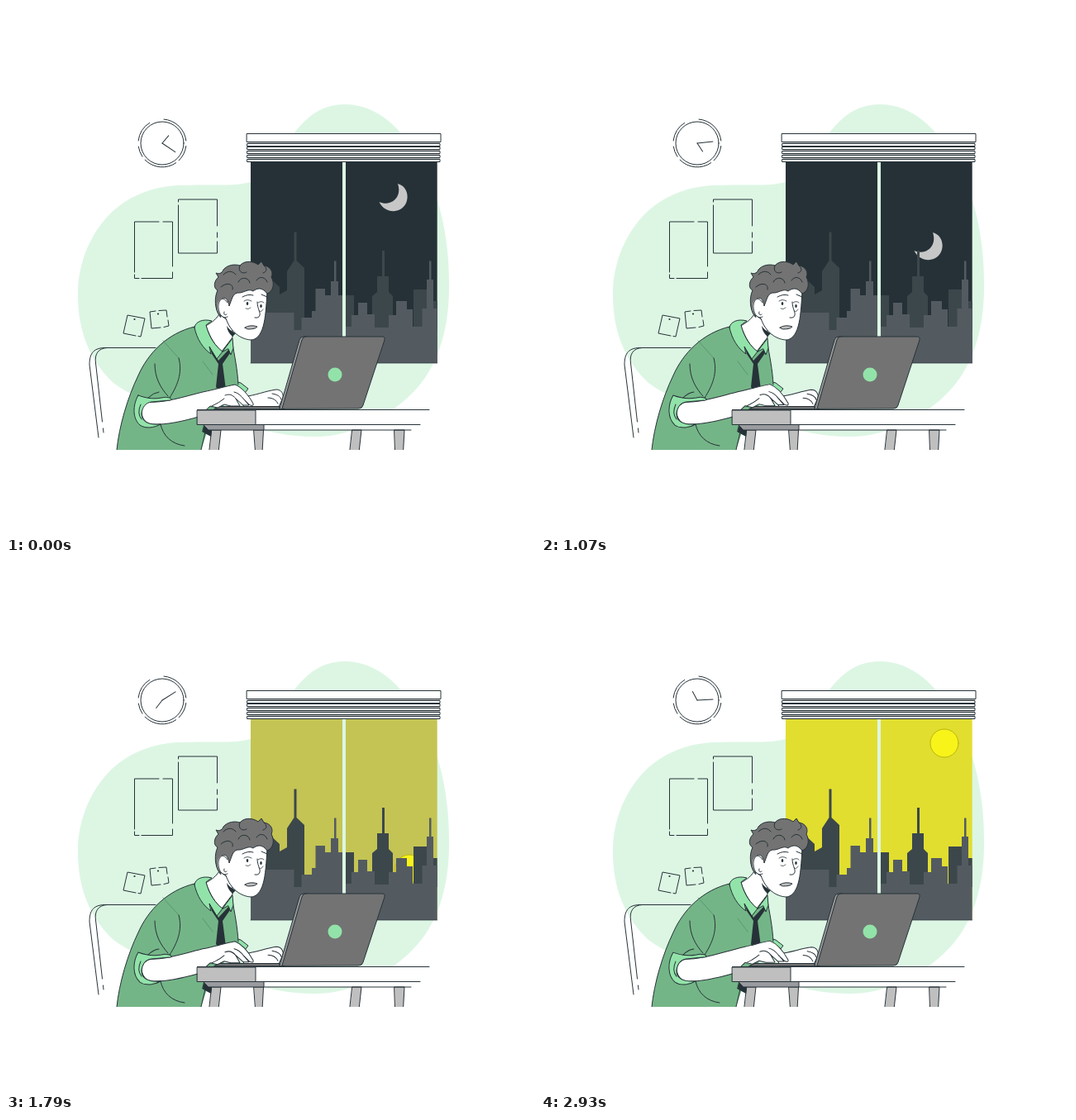
Write an HTML page that moves like this. It is 640 by 640 pixels and loops after 3 s.

```html
<!DOCTYPE html>
<html lang="en">
<head>
<meta charset="utf-8">
<title>Late night at work</title>
<style>
html, body { margin: 0; width: 100%; height: 100%; overflow: hidden; background: #fff; }
svg { display: block; width: 100%; height: 100%; }
.line { fill: none; }
.ink { fill: #263238; }
.white { fill: #fff; }
.pale { fill: #ddf6e4; }
.mint { fill: #92e3a9; }
.shirt { fill: #74b587; }
.grey { fill: #737373; }
.silver { fill: #bfbfbf; }
.far { fill: #3c474b; }
.near { fill: #535b61; }
.flat { stroke: none; }
</style>
</head>
<body>
<svg viewBox="0 0 640 640" stroke="#263238" stroke-linecap="round" stroke-linejoin="round">
  <defs>
    <clipPath id="pane"><path d="M296 166H521.700V432H296Z"/></clipPath>
  </defs>

  <path class="pale flat" d="M87 345C88 295 120 222 208 217C250 215 272 219 296 213C335 200 345 119 410 119C450 119 480 150 497 182C520 215 536 270 536 335C537 400 518 455 468 488C435 510 405 521 375 521C320 521 290 505 250 497C215 487 165 483 130 456C100 428 86 390 87 345Z"/>

  <!-- clock -->
  <circle class="white" cx="189" cy="166" r="26"/>
  <g id="rim" class="line"></g>
  <path id="hour" class="line" d="M189 166V154"/>
  <path id="minute" class="line" d="M189 166V147"/>

  <!-- wall -->
  <g class="line">
    <path d="M185 261H155.500V322M155.500 325V329.500H161M164 329.500H201.500V322M201.500 315V261H190"/>
    <path d="M208.500 237V234H255.500V266M255.500 274V280M255.500 285V299H208.500V241"/>
    <path d="M157 399L142 396L147 374L168 378L163 400L160 399.500M187 389L176 390L174 370L181 369M185 368.500L194 368L195 376M196 380L197 387L191 388.500"/>
  </g>
  <circle class="ink flat" cx="155.500" cy="379" r="1.100"/>
  <circle class="ink flat" cx="184" cy="372.500" r="1.100"/>

  <!-- window -->
  <g clip-path="url(#pane)">
    <path id="sky" class="flat" d="M296 166H522V432H296Z"/>
    <path id="moon" class="flat" fill="#c7c7c7" d="M474 215C489 219 489 240 477 246C468 251 456 247 451.500 237C464 243 480 233 474 215Z"/>
    <circle id="sun" cx="488" r="17" fill="#f8f41a" stroke="#b9b50c"/>
    <g class="flat">
      <path class="far" d="M296 328H318L331 340V349L340 344V321L348.500 308V273.500H351.500V308L361 317V400H296ZM406 350H421V392H406ZM443 392V351L449 346V327H455V296H458V327H463V346L468 351V392ZM493 343H511V357H522V392H493Z"/>
      <path class="near" d="M296 371H348.500V392H357.500V377H370V369H374.500V342H386V350H393V333H397V308.500H399.500V333H402V350H407V369H410V388H418V374H426V359H437V373H446V389H463V374H472V357H485V367H492V388H503.500V366H509V331H512V308.500H514.500V331H517V366H522V432H296Z"/>
    </g>
  </g>
  <path class="pale flat" d="M407 168H411V432H407Z"/>
  <path class="line" stroke-width=".7" d="M296 432H521.500"/>
  <path class="silver flat" d="M293 165H525V189H293Z"/>
  <g id="slats" class="white"></g>
  <path class="white" d="M291.500 154.500H526V164.500H291.500Z"/>

  <!-- chair -->
  <path class="line" d="M112 522L101 434C101 420 106 413 122 413.500H181M122 413.500C111 414 107 422 108.500 432L116.500 503M117.500 511L118 516"/>

  <!-- far arm -->
  <path class="mint" d="M259 465C264 455 276 453 284 456L293 463L286 472Z"/>
  <path id="farHand" class="white" d="M286 473C303 471 313 466 327 464C333 464 336 469 335 474L329 487H288ZM322 469C328 470 332 472 333 476M317 474C323 474 327 477 329 481"/>

  <!-- shirt -->
  <path class="shirt" stroke="none" d="M134 537C137 508 147 474 160 447C172 420 195 396 228 388L247 405L273 404C277 425 280 440 281 458L262 466L264 488L246 507L236 537Z"/>
  <path class="line" d="M134 537C137 508 147 474 160 447C172 420 195 396 228 388M273 404C277 425 280 440 281 458M236 537L243 507"/>
  <path class="line" stroke="#4f8a63" stroke-width=".7" d="M190 405L209 426M238 430L250 446"/>
  <path class="line" d="M209 426C214 444 207 460 198 474M180 433C180 450 187 462 196 472M187 506C190 520 200 530 216 532"/>

  <!-- neck and tie -->
  <path class="white" d="M258 373C252 382 246 384 242 387C247 402 254 412 261 418L274 401V385Z"/>
  <path class="ink flat" d="M267 387Q271 393 278 396L274 400Q268 395 267 387Z"/>
  <path class="ink flat" d="M247 413L257 429L270 415L271 420L262 433L266 464L259 468L254 461L257 433L249 421Z"/>
  <path class="mint" d="M228 389C229 382 238 378 249 381L242 386C246 402 254 412 262 418L255 427L246 412L248 421C238 414 231 403 228 389Z"/>
  <path class="mint" d="M262 418L274 402L275 414L272 422L269 415Z"/>
  <path class="ink" d="M240 507H249V521L238 515Z"/>

  <!-- head -->
  <path class="white" d="M262 352C273 340 300 333 316 345C315 362 314 378 311 388C308 398 303 404 296 404C284 403 272 395 266 378C255 374 254 356 262 352Z"/>
  <path class="grey" d="M259 376C252 367 252 352 256 344C250 341 252 332 257 328L254 323C259 325 262 322 263 319C268 313 277 312 283 314C289 307 300 309 305 313L309 309L312 314C320 315 324 322 321 328C325 335 324 345 316 348C310 340 304 341 299 345C293 341 287 348 280 347C274 348 273 356 270 363C269 353 262 350 259 357C257 363 257 369 260 376Z"/>
  <path class="line" d="M263 325C269 319 275 321 278 325M283 314C280 321 286 325 291 322M260 340C268 333 276 337 274 343M281 334C284 327 294 328 295 335M303 332C307 326 314 328 316 334M312 314C317 318 315 322 311 323"/>
  <path class="white flat" d="M257 358C262 350 268 354 269 362L269 377C258 378 254 367 257 358Z"/>
  <path class="line" d="M268 359C263 350 256 355 257 366C258 374 263 379 268 376M264 370C263 373 265 375 267 373"/>
  <path class="line" d="M286 352Q293 348 299 350M309 349L316 352"/>
  <path class="line" d="M304 358C304 366 308 370 307 374Q306 378 301 377"/>
  <path class="line" stroke-width=".7" d="M290 366Q293 368 296 365M306 369Q309 371 311 367"/>
  <path id="lids" class="line" stroke-width=".8"/>
  <g id="pupils" class="ink flat">
    <ellipse cx="292" cy="360" rx="1.300" ry="2"/>
    <ellipse cx="308.500" cy="363" rx="1.300" ry="2"/>
  </g>
  <path class="silver" d="M289 389Q296 385 304 388Q302 391 293 391Z"/>

  <path class="grey" d="M252 487.500L258 484.500H331V487.500Z"/>

  <!-- near arm -->
  <g id="arm">
    <path class="white" d="M170 479C190 481 214 473 238 467C253 464 266 460 277 458C285 461 293 470 299 481C300 484 297 484 294 482L288 476L294 483H287L278 475L283 484H272L264 482L256 486L247 484L233 497C215 502 195 507 176 506C162 503 161 486 170 479Z"/>
    <path class="line" d="M278 475C274 470 270 469 265 471M288 476Q282 468 276 467M249 484Q258 480 264 475"/>
    <path class="mint" d="M160 471C153 483 153 499 162 507C169 512 180 510 187 506C172 507 164 503 164 493C165 485 169 480 176 479L199 477C203 475 195 472 188 474C177 476 168 474 160 471Z"/>
    <path class="line" d="M163 482Q158 493 164 500M172 474Q178 468 185 467"/>
  </g>

  <!-- table -->
  <path class="white flat" d="M302 489H512L500 506L490 513H302Z"/>
  <path class="silver" d="M249 513H260L257 540H246ZM300 513H311.500L310 540H302ZM419 513H430L427 540H416ZM470 513H482L480.500 540H471Z"/>
  <path fill="#999b9f" d="M239 506.500H312V513H245Z"/>
  <path class="silver" d="M231.500 489H302V506.500H231.500Z"/>
  <path class="line" d="M231.500 488.500H512M302 506.500H501M312 513H490"/>
  <path class="white flat" d="M130 537H500V545H130Z"/>

  <!-- laptop -->
  <path fill="#999" d="M331 487L355 404Q356 400 360 400H366L337 487Z"/>
  <path class="grey" d="M334 487L358 404Q359 400 363 400H455Q459 400 458 404L432 483Q431 487 427 487Z"/>
  <circle class="mint flat" cx="398" cy="446" r="8.500"/>
</svg>
<script>
const LOOP = 3000, STEPS = 42;
const NIGHT = [37, 49, 55], DAWN = [214, 213, 87], DAY = [226, 223, 45];
const el = id => document.getElementById(id);
const set = (id, name, value) => el(id).setAttribute(name, value);
const clamp = x => Math.min(1, Math.max(0, x));
const mix = (a, b, k) => a.map((v, i) => v + (b[i] - v) * k);

function arc(from, to, r = 29) {
  const at = deg => {
    const a = deg * Math.PI / 180;
    return `${189 + r * Math.sin(a)} ${166 - r * Math.cos(a)}`;
  };
  return `<path d="M${at(from)}A${r} ${r} 0 0 1 ${at(to)}"/>`;
}

el('rim').innerHTML = [[4, 84], [97, 136], [145, 226], [236, 262], [276, 328]]
  .map(([a, b]) => arc(a, b)).join('');
el('slats').innerHTML = [166.5, 170.5, 175.5, 180.5, 185.5]
  .map(y => `<path d="M292 ${y}H525V${y + 3}H292Z"/>`).join('');

function draw(ms) {
  // motion advances in even steps
  const n = Math.floor((ms % LOOP + 4.5) * STEPS / LOOP) % STEPS;

  set('hour', 'transform', `rotate(${40 + 7.12 * n} 189 166)`);
  set('minute', 'transform', `rotate(${124 + 69.35 * n} 189 166)`);

  const sky = n < 26 ? mix(NIGHT, DAWN, clamp((n - 16.2) / 9.8)) : mix(DAWN, DAY, (n - 26) / 16);
  set('sky', 'fill', `rgb(${sky.map(Math.round)})`);
  set('moon', 'transform', `translate(0 ${59 * (n / 15) ** 3.4})`);
  set('sun', 'cy', n < 21 ? 700 : 218 + 486 * ((42 - n) / 21) ** 5.5);

  const tap = Math.sin(n / STEPS * 20 * Math.PI);
  set('arm', 'transform', `rotate(${0.5 * tap} 176 494)`);
  set('farHand', 'transform', `rotate(${-1.2 * tap} 288 478)`);

  const blink = Math.abs(n % 22 - 9) < 2;
  const y = blink ? 359 : 357;
  set('lids', 'd', `M288 ${y}Q292 ${y - 3} 297 ${y}M305 ${y + 2}Q309 ${y - 1} 312 ${y + 2}`);
  set('pupils', 'transform', blink ? 'translate(0 1)' : '');
}

function tick(now) {
  draw(now);
  requestAnimationFrame(tick);
}
draw(0);
requestAnimationFrame(tick);
</script>
</body>
</html>
```
